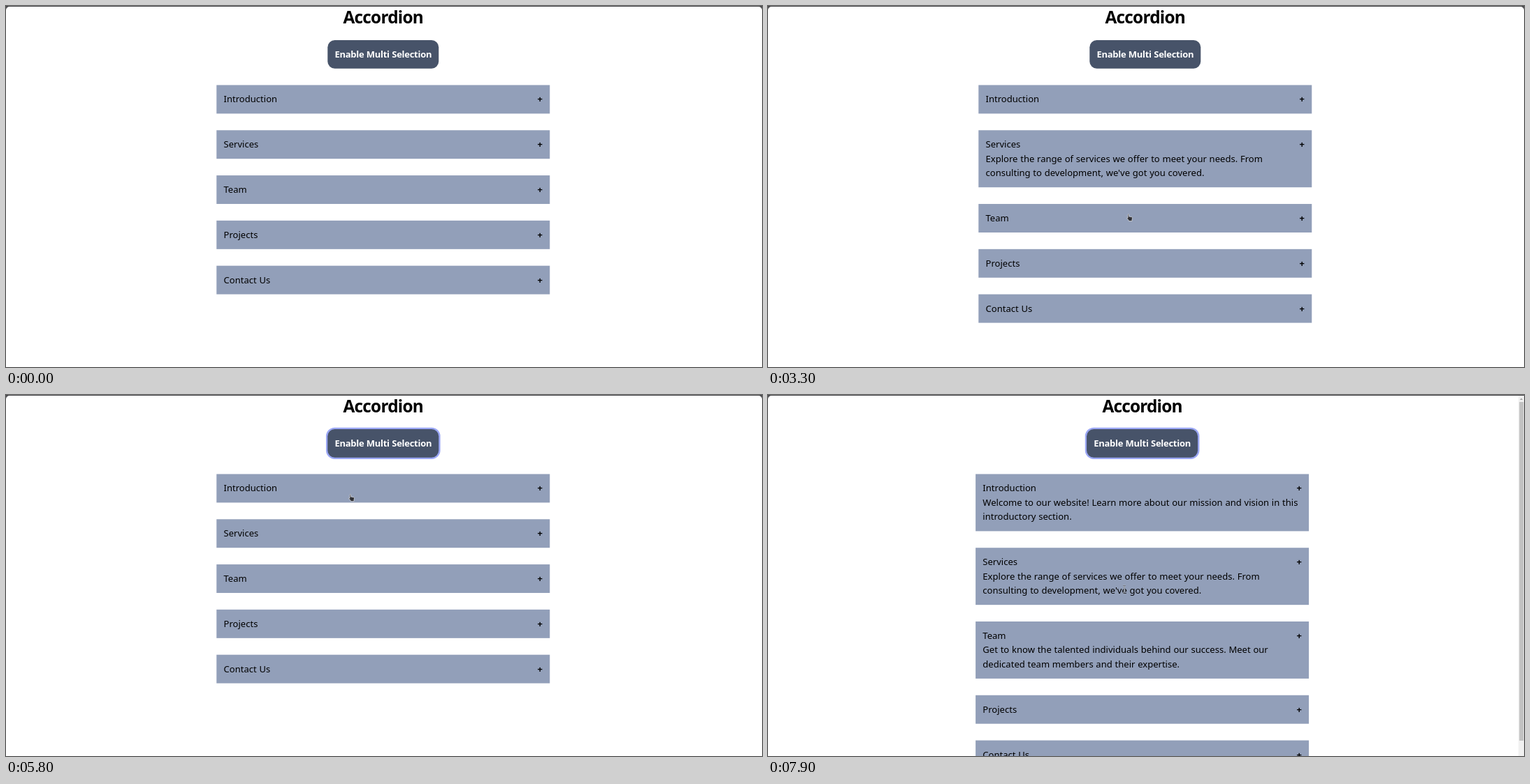
Write an HTML page that moves like this. It is 1082 px wide and 518 px high and loops after 8 s.

```html
<!DOCTYPE html>
<html lang="en">
<head>
<meta charset="utf-8">
<title>Accordion</title>
<style>
  html, body { margin: 0; width: 100%; height: 100%; overflow: hidden; background: #fff; }
  svg { display: block; }
  text { font: 13.05px "Noto Sans", "Open Sans", sans-serif; word-spacing: .35px; white-space: pre; }
  .heading { font-size: 24.4px; font-weight: 700; letter-spacing: -.8px; }
  .label { font-size: 13px; font-weight: 700; letter-spacing: -.27px; fill: #fff; }
  .plus { font-weight: 700; }
  .mid { text-anchor: middle; }
  .end { text-anchor: end; }
</style>
</head>
<body>
<svg id="stage" width="1082" height="518" viewBox="0 0 1082 518"></svg>
<script>
const stage = document.getElementById('stage');
const LOOP = 8000, TOP = 113.45, LINE = 20.48, PAD = 10.24, GAP = 23.85;
const LEFT = 301.3, WIDTH = 477, MID = 539.8;

const sections = [
  ['Introduction', 'Welcome to our website! Learn more about our mission and vision in this', 'introductory section.'],
  ['Services', 'Explore the range of services we offer to meet your needs. From', "consulting to development, we've got you covered."],
  ['Team', 'Get to know the talented individuals behind our success. Meet our', 'dedicated team members and their expertise.'],
  ['Projects'],
  ['Contact Us']
];

const pointers = {
  none: '',
  hand: '<path d="M2 1Q2.8 0 3.6 1V4L7.6 4.8Q8.7 5.2 8.5 6.3L8 8.5V10.6H3.3L3 9.2L.5 6.6Q.6 5.3 2 6.2Z" fill="#303136" stroke="#e4e6ea" stroke-width=".7"/>',
  arrow: '<path d="M.4.4V8.6L2.3 7L3.6 9.8L4.9 9.2L3.7 6.5H6.2Z" fill="#222" stroke="#e4e6ea" stroke-width=".6"/>',
  beam: '<path d="M1 .5H5M1 10.5H5M3 .5V10.5" fill="none" stroke="#c3c8d2" stroke-width="1.6"/><path d="M1 .5H5M1 10.5H5M3 .5V10.5" fill="none" stroke="#59606e" stroke-width=".7"/>'
};

// time, pointer, x, y
const moves = [
  [0, 'none', 0, 0], [500, 'hand', 541, 61], [600, 'hand', 542, 62],
  [900, 'hand', 540, 78], [1000, 'arrow', 536, 102], [1100, 'hand', 532, 129],
  [1700, 'hand', 531, 138], [1800, 'beam', 529, 158], [1900, 'beam', 526, 178],
  [2000, 'arrow', 522, 201], [2100, 'hand', 519, 222], [2300, 'hand', 517, 230],
  [3300, 'hand', 513, 298], [3800, 'hand', 515, 300],
  [4100, 'arrow', 543, 118], [4300, 'arrow', 537, 97], [4500, 'hand', 521, 78],
  [4700, 'hand', 517, 72], [5100, 'hand', 515, 74],
  [5400, 'arrow', 506, 98], [5600, 'hand', 494, 130], [5800, 'hand', 490, 142],
  [6100, 'hand', 490, 136], [6300, 'beam', 496, 178], [6500, 'hand', 502, 233],
  [6700, 'hand', 502, 236], [6900, 'beam', 501, 270],
  [7200, 'hand', 498, 339], [7400, 'hand', 498, 342], [7900, 'beam', 507, 273]
];

// time, open sections
const clicks = [
  [0, []], [1500, [0]], [2700, [1]], [3600, [2]], [4900, []],
  [6100, [0]], [6700, [0, 1]], [7400, [0, 1, 2]]
];
const FOCUS = 4900;

const last = (list, t) => list.findLast(entry => entry[0] <= t);
const rect = (x, y, w, h, fill, extra = '') =>
  `<rect x="${x}" y="${y}" width="${w}" height="${h}" fill="${fill}" ${extra}/>`;
const text = (x, y, str, cls = '') => `<text x="${x}" y="${y}" class="${cls}">${str}</text>`;

function accordion(open) {
  let y = TOP, out = '';
  sections.forEach((lines, i) => {
    const shown = open.includes(i) ? lines : lines.slice(0, 1);
    const height = shown.length * LINE + 2 * PAD;
    out += rect(LEFT, y, WIDTH, height, '#929fb9');
    shown.forEach((str, n) => out += text(LEFT + PAD, y + 25 + n * LINE, str));
    out += text(LEFT + WIDTH - PAD, y + 25, '+', 'plus end');
    y += height + GAP;
  });
  return out;
}

function button(focused) {
  const ring = focused ? rect(458, 46.7, 163.6, 45.2, '#9ba7f5', 'rx="12.5"') : '';
  return ring + rect(460.3, 49, 159, 40.8, '#475369', 'rx="10.2"')
    + text(MID, 74, 'Enable Multi Selection', 'label mid');
}

const scrollbar = rect(1074, 1, 8, 517, '#f1f1f1') + rect(1075.3, 10, 6, 486, '#c1c1c1')
  + '<path d="M1076 7L1078.2 4.5L1080.4 7Z" fill="#a3a3a3"/>';

function scene(t) {
  const [, open] = last(clicks, t), [, pointer, x, y] = last(moves, t);
  const tall = open.length > 2;
  return rect(0, 0, 1082, 518, '#4b4b4e') + rect(0, 1, 1082, 540, '#fff', 'rx="5"')
    + `<g transform="translate(${tall ? -4.2 : 0})">`
    + text(MID, 25, 'Accordion', 'heading mid') + button(t >= FOCUS) + accordion(open) + '</g>'
    + (tall ? scrollbar : '')
    + `<g transform="translate(${x} ${y})">${pointers[pointer]}</g>`;
}

let drawn = '';
function frame() {
  const next = scene(performance.now() % LOOP);
  if (next !== drawn) stage.innerHTML = drawn = next;
  requestAnimationFrame(frame);
}
frame();
</script>
</body>
</html>
```
